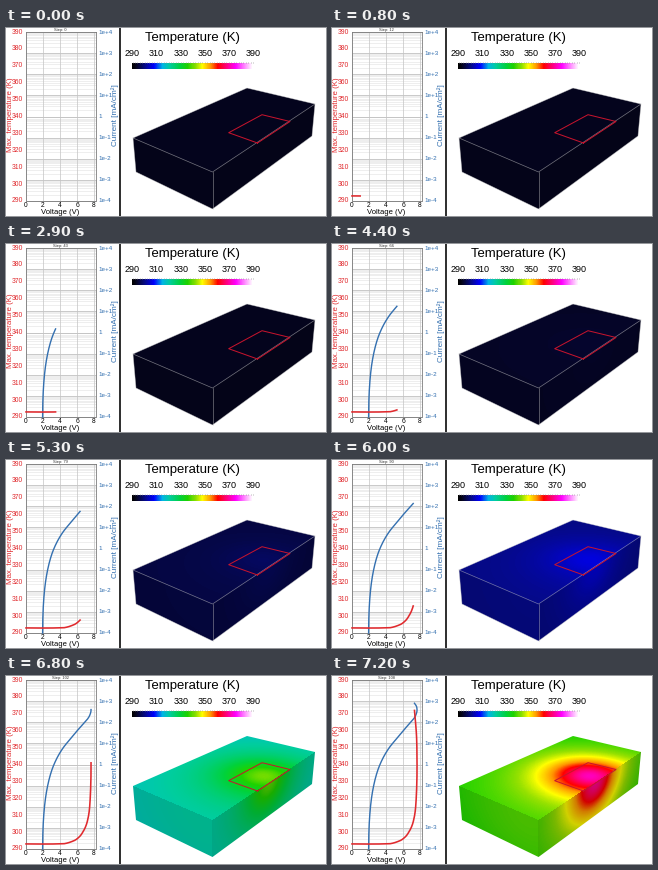
A matplotlib script that plays this animation: 320 by 188 pixels, repeating every 7.3 s.

```python
import numpy as np
import matplotlib.pyplot as plt
from matplotlib.animation import FuncAnimation
from matplotlib.colors import LinearSegmentedColormap
from matplotlib.patches import Polygon

W, H, DPI = 320, 188, 100
FRAMES, INTERVAL = 73, 100
PT = 72 / DPI  # points per pixel
RED, BLUE = "#e02a2e", "#3470b0"
AMBIENT = 293.0

plt.rcParams["font.family"] = "Liberation Sans"
fig = plt.figure(figsize=(W / DPI, H / DPI), dpi=DPI, facecolor="white")
ax = fig.add_axes([0, 0, 1, 1])


def label(x, y, text, size, color="black", **kw):
    kw = {"ha": "center", "va": "center", **kw}
    return ax.text(x, y, text, fontsize=size * PT, color=color, **kw)


def line(xs, ys, color, width, **kw):
    return ax.plot(xs, ys, color=color, lw=width * PT, **kw)[0]


def smooth(t, keys, values):
    """Cubic Hermite curve through the key points."""
    keys, values = np.asarray(keys, float), np.asarray(values, float)
    slopes = np.gradient(values, keys)
    k = np.clip(np.searchsorted(keys, t, side="right") - 1, 0, len(keys) - 2)
    h = keys[k + 1] - keys[k]
    s = np.clip((t - keys[k]) / h, 0, 1)
    return ((1 + 2 * s) * (1 - s) ** 2 * values[k]
            + s * (1 - s) ** 2 * h * slopes[k]
            + s * s * (3 - 2 * s) * values[k + 1]
            + s * s * (s - 1) * h * slopes[k + 1])


# Device behaviour over time, in steps
ONSET = 16.3


def voltage(t):
    late = smooth(t, [56, 60, 64, 68, 70, 72], [6.72, 7.2, 7.52, 7.65, 7.59, 7.35])
    return np.where(t < 60, 0.12 * t, late)


def max_temp(t):
    return smooth(t, [0, 29, 38, 44, 50, 55, 60, 64, 68, 70, 72],
                  [AMBIENT, AMBIENT, 293.2, 294.2, 296, 299.3, 306, 317, 341, 357, 372])


def log_current(t):
    """Decades of current; the root keeps the steep onset smooth."""
    keys = np.array([ONSET, 17, 19.1, 21.6, 25.5, 29, 36, 44, 52, 60, 64, 68, 72])
    return smooth(np.sqrt(t - ONSET), np.sqrt(keys - ONSET),
                  [-4, -2.7, -1.6, -0.92, -0.24, 0.17, 0.76, 1.24, 1.7, 2.13, 2.35,
                   2.6, 2.9])


# Chart
LEFT, RIGHT, TOP, BOTTOM = 20, 90, 4, 173


def px_volt(v):
    return LEFT + 8.5 * v


def px_temp(t):
    return BOTTOM - (t - 290) * (BOTTOM - TOP) / 100


def px_log(e):
    return BOTTOM - (e + 4) * (BOTTOM - TOP) / 8


def draw_chart():
    minor = [px_log(d + np.log10(m)) for d in range(-4, 4) for m in range(2, 10)]
    ax.hlines(minor, LEFT, RIGHT, color="#dedede", lw=0.5 * PT)
    ax.hlines(px_log(np.arange(-4, 5)), LEFT, RIGHT, color="#b4b4b4", lw=0.7 * PT)
    ax.vlines(px_volt(np.arange(0, 9, 2)), TOP, BOTTOM, color="#c4c4c4", lw=0.7 * PT)
    line([LEFT, RIGHT], [TOP, TOP], "#777777", 0.8)
    line([LEFT, LEFT, RIGHT, RIGHT], [TOP, BOTTOM, BOTTOM, TOP], "#777777", 0.8)

    for t in range(290, 391, 10):
        label(17.3, px_temp(t), str(t), 6.8, RED, ha="right")
    for e in range(-4, 5):
        label(92, px_log(e), f"1e{e:+d}" if e else "1", 6.3, BLUE, ha="left")
    for v in range(0, 9, 2):
        label(px_volt(v), 177.5, str(v), 6.7)
    label(4.3, 87, "Max. temperature (K)", 7.9, RED, rotation=90)
    label(109.5, 87, "Current [mA/cm²]", 8.2, BLUE, rotation=90)
    label(54.5, 184, "Voltage (V)", 7.6)
    line([114, 114], [0, H], "black", 1.6)


# Colour scale
STOPS = [(290, "#000000"), (293, "#05051e"), (300, "#060a82"), (308, "#0000ff"),
         (315, "#00b4e6"), (321, "#00cda0"), (330, "#00d23c"), (336, "#1ed200"),
         (343, "#96e100"), (348, "#ffff00"), (355, "#ff9600"), (361, "#ff0000"),
         (368, "#ff0078"), (376, "#ff00ff"), (390, "#ffffff")]
cmap = LinearSegmentedColormap.from_list(
    "heat", [((t - 290) / 100, c) for t, c in STOPS], N=512)


def px_scale(t):
    return 126.5 + 1.205 * (t - 290)


def draw_scale():
    label(186, 9.5, "Temperature (K)", 13.1)
    for t in range(290, 391, 20):
        label(px_scale(t), 26, str(t), 9)
    ax.vlines(px_scale(np.arange(290, 391, 2)), 33.5, 35, color="#909090", lw=0.6 * PT)
    ax.imshow(np.linspace(0, 1, 240)[None], cmap=cmap, extent=(126, 247, 41, 35),
              aspect="auto", interpolation="nearest")


# Block: corners of the top face, then of the lower edge
A, B, C, D = (127, 110), (241, 60), (309, 76), (206.5, 144)
A2, C2, D2 = (130, 144), (306, 108), (206.5, 181)


def unproject(quad, x, y):
    """Map pixels inside a perspective quad to the unit square."""
    rows, rhs = [], []
    for (px, py), (u, v) in zip(quad, [(0, 0), (1, 0), (1, 1), (0, 1)]):
        rows += [[px, py, 1, 0, 0, 0, -u * px, -u * py],
                 [0, 0, 0, px, py, 1, -v * px, -v * py]]
        rhs += [u, v]
    a, b, c, d, e, f, g, h = np.linalg.solve(np.array(rows, float), rhs)
    den = g * x + h * y + 1
    den = np.where(np.abs(den) < 1e-6, 1e-6, den)
    return (a * x + b * y + c) / den, (d * x + e * y + f) / den


def heat_profile():
    """Share of the heating and the shade for each pixel of the stage."""
    x, y = np.meshgrid(np.arange(W) + 0.5, np.arange(H) + 0.5)

    def spread(u, v, w):
        r2 = (2 * (u - 0.5)) ** 2 + (v - 0.12) ** 2 + (0.5 * w) ** 2
        return 1 / (1 + r2 / 0.45 ** 2)

    top = spread(*unproject([D, C, B, A], x, y), 0)
    u, w = unproject([D, C, C2, D2], x, y)
    right = spread(u, 0, w)
    v, w = unproject([D, A, A2, D2], x, y)
    left = spread(0, v, w)
    on_side = y > np.interp(x, [A[0], D[0], C[0]], [A[1], D[1], C[1]])
    on_left = x < D[0]
    share = np.where(on_side, np.where(on_left, left, right), top)
    shade = np.where(on_side, np.where(on_left, 0.87, 0.82), 1.0)
    return share, shade[..., None]


share, shade = heat_profile()


def block_image(peak):
    base = AMBIENT + 0.5 * (peak - AMBIENT)
    temp = base + (peak - base) * share
    return cmap((temp - 290) / 100)[..., :3] * shade


draw_chart()
draw_scale()

block = ax.imshow(block_image(AMBIENT), extent=(0, W, H, 0), aspect="auto",
                  interpolation="nearest")
outline = Polygon([A, B, C, C2, D2, A2], closed=True, transform=ax.transData)
block.set_clip_path(outline)
edges = [line(*zip(*path), "#d0d0d0", 0.7)
         for path in ([A, D, C], [D, D2], [A, B, C, C2, D2, A2, A])]
line(*zip((251.5, 115), (222.7, 104.7), (256, 86.7), (284, 93.5), (251.5, 115)),
     "#c8142d", 1)

step = label(54, 2.2, "", 4, "#333333")
current = line([], [], BLUE, 1.4)
heat = line([], [], RED, 1.6)

ax.set_xlim(0, W)
ax.set_ylim(H, 0)
ax.axis("off")


def update(i):
    t = np.linspace(0, i, 6 * i + 1)
    heat.set_data(px_volt(voltage(t)), px_temp(max_temp(t)))
    t = np.linspace(ONSET, i, 8 * i) if i > ONSET else np.array([])
    current.set_data(px_volt(voltage(t)), px_log(log_current(t)))

    peak = float(max_temp(i))
    block.set_data(block_image(peak))
    # The pale edges fade as the block lights up
    for edge in edges:
        edge.set_alpha(0.55 * np.clip((335 - peak) / 30, 0, 1))
    step.set_text(f"Step: {i * 3 // 2}")
    return heat, current, block, step, *edges


anim = FuncAnimation(fig, update, frames=FRAMES, interval=INTERVAL,
                     repeat=True, repeat_delay=0, blit=False)
plt.show()
```
